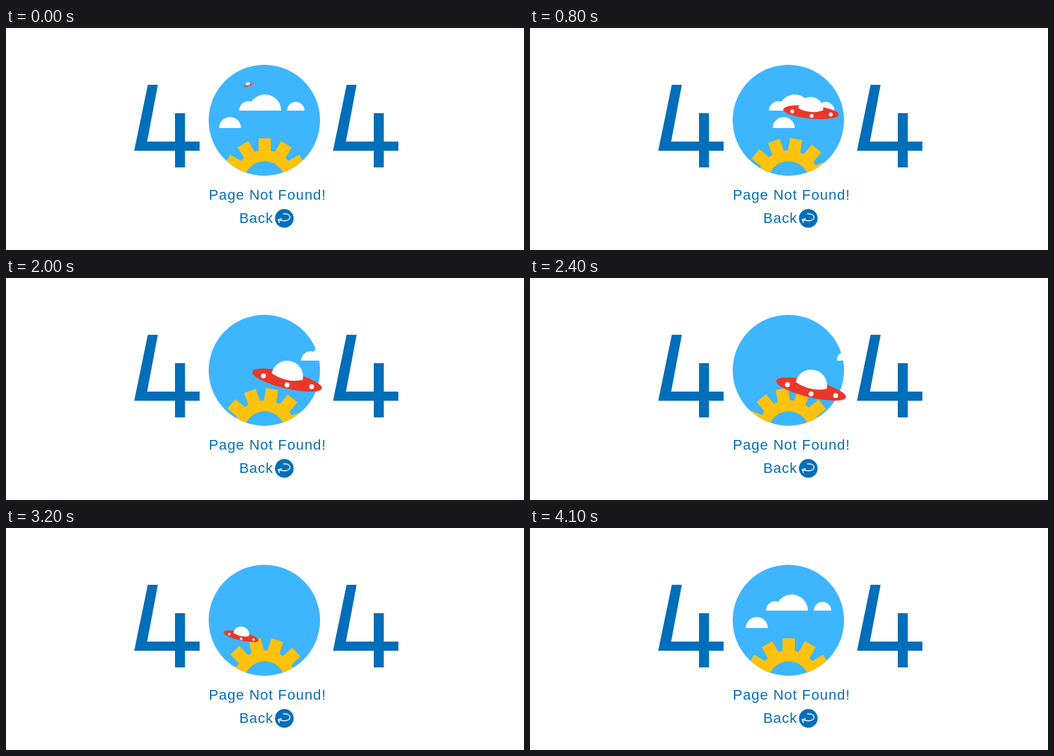
These frames come from a looping animation (800 px wide and 344 px high, 4.2 s). An HTML page:

```html
<!DOCTYPE html>
<html lang="en">
<head>
<meta charset="utf-8">
<title>404</title>
<style>
html, body { margin: 0; width: 100%; height: 100%; overflow: hidden; background: #fff; }
svg { display: block; width: 100vw; height: 100vh; }
text { font: 22px "Liberation Sans", Arial, sans-serif; letter-spacing: 1px; }
</style>
</head>
<body>
<svg viewBox="0 0 800 344">
  <defs>
    <clipPath id="disc"><circle cx="399" cy="143" r="86"/></clipPath>
    <path id="four" d="M219 88H234.5L218 176H261V132H276.5V176H299V190.3H276.5V216H261V190.3H198Z"/>
  </defs>
  <g fill="#006eb8">
    <use href="#four"/>
    <use href="#four" x="307"/>
    <text x="313.2" y="266">Page Not Found!</text>
    <text x="360.2" y="302">Back</text>
    <circle cx="429.8" cy="295" r="14.4"/>
  </g>
  <path d="M428 288C435 287.5 439 290 438.6 293.5C438 299 429 300 420.5 297M426 295.5L420.5 297L422.5 302" fill="none" stroke="#fff" stroke-width="1.4"/>
  <circle cx="399" cy="143" r="86" fill="#3db5ff"/>
  <g clip-path="url(#disc)">
    <g id="gear" fill="#ffc20e"></g>
    <g fill="#fff">
      <g id="clouds">
        <path d="M360 128A14.5 14.5 0 0 1 389 128Z"/>
        <path d="M375 128A25 25 0 0 1 425 128Z"/>
        <path d="M434 128A13.5 13.5 0 0 1 461 128Z"/>
      </g>
      <path id="low" d="M329 155A17 17 0 0 1 363 155Z"/>
    </g>
  </g>
  <g id="ufo" fill="#fff">
    <ellipse rx="55.3" ry="13" fill="#e93829"/>
    <path d="M-25.5 -5A24.5 24.5 0 0 1 23.5 -6Q0 5 -25.5 -5Z"/>
    <circle cx="-37" cy="2" r="3.8"/>
    <circle cx="1.8" cy="7.3" r="3.8"/>
    <circle cx="39.4" cy="1" r="3.8"/>
  </g>
</svg>
<script>
const LOOP = 4200, STEP = 100;
const el = id => document.getElementById(id);
const put = (id, value) => el(id).setAttribute("transform", value);

// Progress from 0 to 1 between two times in seconds
const ramp = (t, from, to) => Math.min(1, Math.max(0, (t - from) / (to - from)));
const easeOut = (t, from, to) => Math.sin(ramp(t, from, to) * Math.PI / 2);

el("gear").innerHTML = Array.from({ length: 12 }, (_, i) =>
  `<rect x="-9.5" y="-67" width="19" height="23" transform="rotate(${i * 30})"/>`).join("") +
  '<circle r="40" fill="none" stroke="#ffc20e" stroke-width="17"/>';

function moveGear(t) {
  const turn = 100 * ramp(t, 0, 2) + 50 * easeOut(t, 2, 4.1) ** 1.25;
  put("gear", `translate(399.5 238) rotate(${turn})`);
}

// The upper clouds leave and return on the right; the low one comes round from the left
function moveClouds(t) {
  const x = 9 * ramp(t, 0, 0.8) + 115 * easeOut(t, 0.8, 3) - 124 * easeOut(t, 3.6, 4.2);
  put("clouds", `translate(${x} 0)`);
  put("low", t < 2.5 ? `translate(${65 * t ** 1.57} 0)`
    : `translate(${84 * (t - 4.05)} ${6 * (4.1 - t)})`);
}

// Approach, hover, dip and fly away
function moveUfo(t) {
  const near = easeOut(t, 0, 1.5);
  const x = 374.5 + 59.5 * ramp(t, 0, 0.8) - 72 * easeOut(t, 2.4, 3.3);
  const y = 88.5 + 83.5 * ramp(t, 0, 1.5) ** 1.1
    - 14 * Math.sin(Math.PI * ramp(t, 1.5, 2.4))
    + 22 * easeOut(t, 2.4, 2.8) - 108 * ramp(t, 2.8, 4.1) ** 1.2;
  const size = 0.148 + 0.852 * near - 0.574 * easeOut(t, 2.4, 3.6) - 0.426 * ramp(t, 3.6, 4.1);
  put("ufo", `translate(${x} ${y}) rotate(${31.5 * near - 18}) scale(${Math.max(0, size)})`);
}

function draw(ms) {
  const t = Math.floor(ms % LOOP / STEP) * STEP / 1000;
  moveGear(t);
  moveClouds(t);
  moveUfo(t);
}

const start = performance.now();
function tick() {
  draw(performance.now() - start);
  requestAnimationFrame(tick);
}
tick();
</script>
</body>
</html>
```
